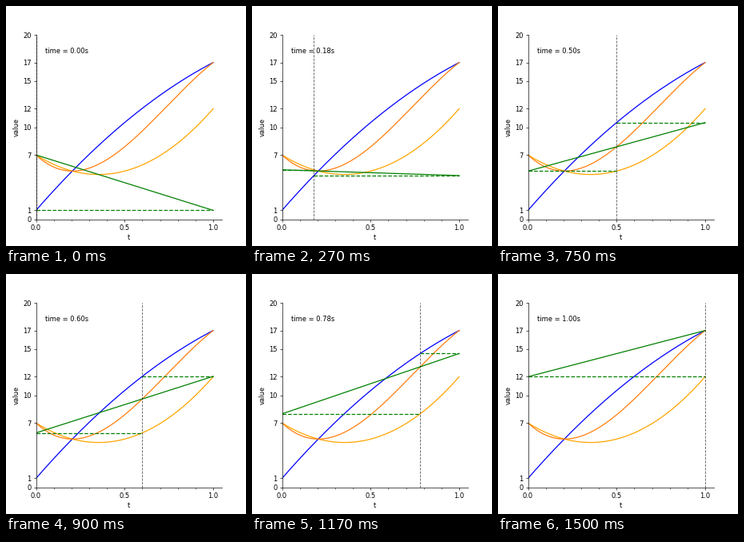
A matplotlib script for the animation above (1530 ms loop, 300 by 300 pixels).

```python
import numpy as np
import matplotlib.pyplot as plt
from matplotlib.animation import FuncAnimation
from matplotlib.ticker import MultipleLocator

FRAMES = 51
POINTS = [7, 1, 12, 17]


def bezier(points, t):
    """De Casteljau evaluation of scalar control values."""
    if len(points) == 1:
        return points[0] + 0 * t
    return (1 - t) * bezier(points[:-1], t) + t * bezier(points[1:], t)


def low(t):
    return bezier(POINTS[:3], t)


def high(t):
    return bezier(POINTS[1:], t)


fig, ax = plt.subplots(figsize=(5, 5), dpi=60)
ax.set(xlim=(0, 1.05), ylim=(0, 20), xlabel="t", ylabel="value")
ax.set_xticks([0, 0.5, 1])
ax.set_yticks([0, 1, 7, 10, 12, 15, 17, 20])
ax.xaxis.set_minor_locator(MultipleLocator(0.1))
ax.spines[["top", "right"]].set_visible(False)

ts = np.linspace(0, 1, 201)
ax.plot(ts, low(ts), color="orange")
ax.plot(ts, high(ts), color="blue")
ax.plot(ts, bezier(POINTS, ts), color="tab:orange")

blend, = ax.plot([], [], color="green")
low_level, = ax.plot([], [], "--", color="green")
high_level, = ax.plot([], [], "--", color="green")
cursor = ax.axvline(0, color="black", alpha=0.65, lw=1, ls="--")
label = ax.text(0.05, 18, "")


def update(frame):
    t = frame / (FRAMES - 1)
    a, b = low(t), high(t)
    blend.set_data([0, 1], [a, b])
    low_level.set_data([0, t], [a, a])
    high_level.set_data([t, 1], [b, b])
    cursor.set_xdata([t, t])
    label.set_text(f"time = {t:.2f}s")
    return blend, low_level, high_level, cursor, label


anim = FuncAnimation(fig, update, frames=FRAMES, interval=30, repeat=True)
plt.show()
```
